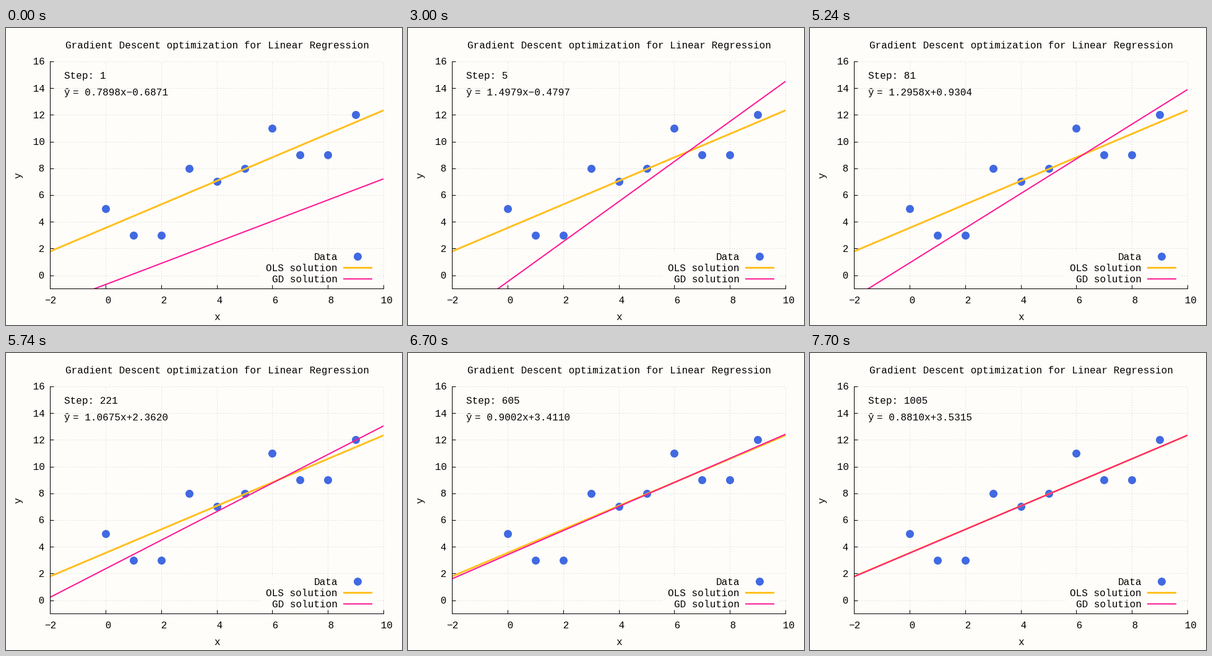
Write a matplotlib script that moves like this. It is 640 px wide and 480 px high and loops after 8000 ms.

```python
import numpy as np
import matplotlib.pyplot as plt
from matplotlib.animation import FuncAnimation

W, H, DPI = 640, 480, 100
LEFT, RIGHT, TOP, BOTTOM = 71.3, 610, 53.9, 421.3
PX = 72 / DPI  # points per pixel
INTERVAL, DURATION = 20, 8000
SLOW_STEP, SLOW_END = 750, 4500

PAPER, GRID = "#fffdfa", "#cacaca"
BLUE, GOLD, PINK = "#4169e1", "#ffc020", "#ff1493"

X = np.arange(10)
Y = np.array([5, 3, 3, 8, 7, 8, 11, 9, 9, 12])
X_ENDS = np.array([-2, 10])


def descend(w, b, steps, rate=0.02):
    """Gradient descent on the mean squared error; returns every (w, b)."""
    path = [(w, b)]
    for _ in range(steps - 1):
        err = w * X + b - Y
        w, b = w - rate * np.mean(err * X), b - rate * np.mean(err)
        path.append((w, b))
    return path


def fast_steps(first=7, last=1005):
    """Step numbers shown in the quick part: by 2 up to 100, then by 8."""
    shown = [first]
    while shown[-1] < last:
        shown.append(shown[-1] + (2 if shown[-1] <= 100 else 8))
    return shown


PATH = descend(0.7898, -0.6871, 1005)
FAST = fast_steps()


def step_at(t):
    if t < SLOW_END:
        return 1 + (t + INTERVAL // 2) // SLOW_STEP
    return FAST[min((t - SLOW_END) // INTERVAL, len(FAST) - 1)]


def px(x):
    return LEFT + (x + 2) * (RIGHT - LEFT) / 12


def py(y):
    return BOTTOM - (y + 1) * (BOTTOM - TOP) / 17


def crisp(v):
    """Centre of the pixel row or column nearest to v."""
    return round(v) + 0.5


plt.rcParams["font.family"] = "Liberation Mono"
plt.rcParams["font.size"] = 16 * PX

fig = plt.figure(figsize=(W / DPI, H / DPI), dpi=DPI, facecolor=PAPER)
ax = fig.add_axes([LEFT / W, 1 - BOTTOM / H,
                   (RIGHT - LEFT) / W, (BOTTOM - TOP) / H])
ax.set_xlim(-2, 10)
ax.set_ylim(-1, 16)
ax.axis("off")

# Overlay in pixels, with y pointing down
page = fig.add_axes([0, 0, 1, 1])
page.set_xlim(0, W)
page.set_ylim(H, 0)
page.axis("off")


def label(x, y, s, ha="left", va="baseline", **kw):
    return page.text(x, y, s, ha=ha, va=va, color="black", **kw)


def stroke(xs, ys, color="black", width=1):
    page.plot(xs, ys, color=color, lw=width * PX,
              solid_capstyle="butt", snap=False)


def grid(xs, ys):
    ax.plot(xs, ys, color=GRID, lw=PX, ls=(0, (1, 3)), dash_capstyle="butt",
            snap=False, clip_on=False, zorder=1, transform=page.transData)


def dots(xs, ys):
    ax.plot(xs, ys, "o", color=BLUE, ms=13 * PX, mew=0, clip_on=False,
            zorder=2, transform=page.transData)


def signed(s):
    return s.replace("-", "\u2212")


def spaced(v):
    return signed(f"{v: d}")


x_axis, y_axis = crisp(BOTTOM), crisp(LEFT)

# Grid with a gap behind the legend, ticks and their labels
for v in range(-2, 11, 2):
    x = crisp(px(v))
    if v in (6, 8):
        grid([x, x], [x_axis, 415])
        grid([x, x], [361, TOP])
    elif v > -2:
        grid([x, x], [x_axis, TOP])
    stroke([x, x], [x_axis, x_axis - 6])
    label(px(v), 445, spaced(v), "center")

for v in range(0, 17, 2):
    y = crisp(py(v))
    if v == 0:
        grid([y_axis, 412], [y, y])
        grid([601, RIGHT], [y, y])
    else:
        grid([y_axis, RIGHT], [y, y])
    stroke([y_axis, y_axis + 6], [y, y])
    label(62.5, py(v) + 5.4, spaced(v), "right")

stroke([y_axis, y_axis], [TOP, x_axis + 0.5])
stroke([y_axis - 0.5, RIGHT + 1], [x_axis, x_axis])

label(341, 33, "Gradient Descent optimization for Linear Regression", "center")
label(341, 472, "x", "center")
label(20, 238, "y", "center", "center", rotation=90)

# Data and fits
dots(px(X), py(Y))
slope, offset = np.polyfit(X, Y, 1)
ax.plot(X_ENDS, slope * X_ENDS + offset, color=GOLD, lw=3 * PX, zorder=3)
fit, = ax.plot(X_ENDS, X_ENDS, color=PINK, lw=2 * PX, zorder=4)

# Legend
for y, name in ((375, "Data"), (393, "OLS solution"), (411, "GD solution")):
    label(536, y, name, "right")
dots([568], [369])
stroke([545, 592], [387.5, 387.5], GOLD, 3)
stroke([545, 592], [405.5, 405.5], PINK, 2)

counter = label(94, 82, "")
label(94, 109, "\u0177")
formula = label(107.7, 109, "")


def update(i):
    step = step_at(i * INTERVAL)
    w, b = PATH[step - 1]
    fit.set_ydata(w * X_ENDS + b)
    counter.set_text(f"Step: {step}")
    formula.set_text(signed(f"= {w:.4f}x{b:+.4f}"))
    return fit, counter, formula


anim = FuncAnimation(fig, update, frames=DURATION // INTERVAL,
                     interval=INTERVAL, repeat=True, repeat_delay=0)
plt.show()
```
